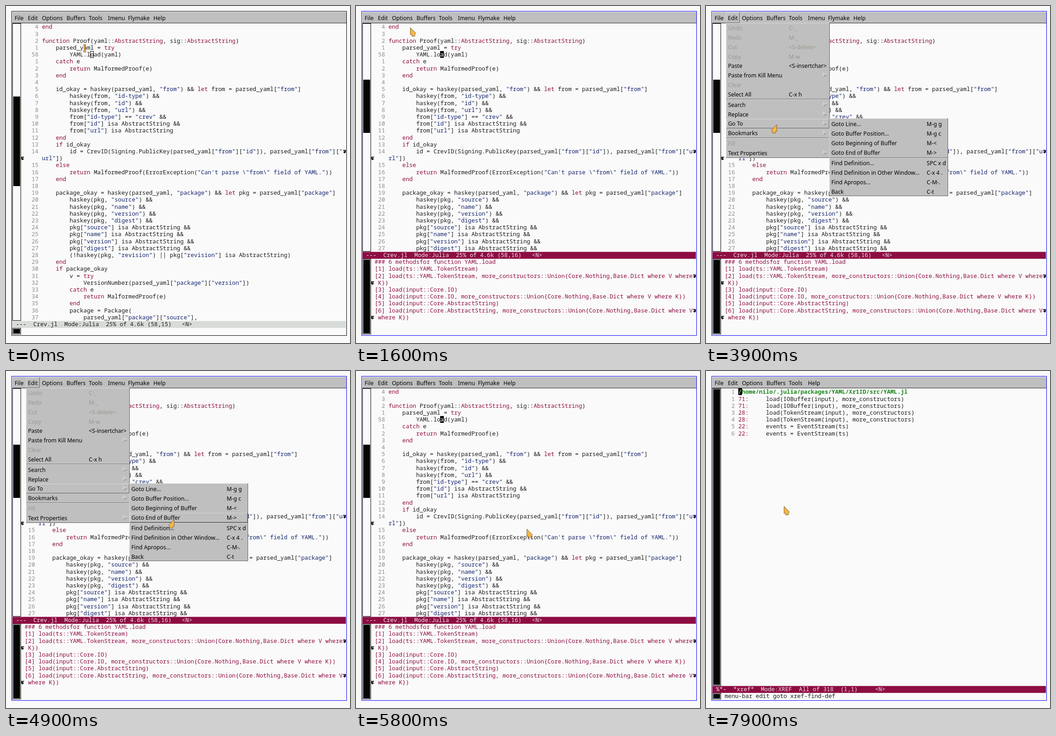
Recreate the animation shown at these times as an HTML page with a canvas. Size 756 px wide and 741 px high, loop 8000 ms.

```html
<!DOCTYPE html>
<html lang="en">
<head>
<meta charset="utf-8">
<style>
html, body { margin: 0; width: 100%; height: 100%; overflow: hidden; background: #fafafa; }
canvas { display: block; }
</style>
</head>
<body>
<canvas id="stage" width="756" height="741"></canvas>
<script>
const ctx = document.getElementById('stage').getContext('2d');
const LOOP = 8000, STEP = 100, CHAR = 7.596, LINE = 15.2, RIGHT = 741;
const MONO = '12.66px "Noto Sans Mono", monospace';
const SANS = '12.25px "Noto Sans", sans-serif';
const PAPER = '#fafafa', INK = '#1b1b1b', WINE = '#8d0d42', NAVY = '#13246c',
      GREEN = '#1d871d', GRAY = '#bfbfbf', DIM = '#8c8c8c';

const code = String.raw`end

function Proof(yaml::AbstractString, sig::AbstractString)
    parsed_yaml = try
        YAML.load(yaml)
    catch e
        return MalformedProof(e)
    end

    id_okay = haskey(parsed_yaml, "from") && let from = parsed_yaml["from"]
        haskey(from, "id-type") &&
        haskey(from, "id") &&
        haskey(from, "url") &&
        from["id-type"] == "crev" &&
        from["id"] isa AbstractString &&
        from["url"] isa AbstractString
    end
    if id_okay
        id = CrevID(Signing.PublicKey(parsed_yaml["from"]["id"]), parsed_yaml["from"]["url"])
    else
        return MalformedProof(ErrorException("Can't parse \"from\" field of YAML."))
    end

    package_okay = haskey(parsed_yaml, "package") && let pkg = parsed_yaml["package"]
        haskey(pkg, "source") &&
        haskey(pkg, "name") &&
        haskey(pkg, "version") &&
        haskey(pkg, "digest") &&
        pkg["source"] isa AbstractString &&
        pkg["name"] isa AbstractString &&
        pkg["version"] isa AbstractString &&
        pkg["digest"] isa AbstractString &&
        (!haskey(pkg, "revision") || pkg["revision"] isa AbstractString)
    end
    if package_okay
        v = try
            VersionNumber(parsed_yaml["package"]["version"])
        catch e
            return MalformedProof(e)
        end
        package = Package(
            parsed_yaml["package"]["source"],`.split('\n');

const union = 'more_constructors::Union{Core.Nothing,Base.Dict where V where K})';
const methods = ['### 6 methodsfor function YAML.load'];
['ts::YAML.TokenStream', 'input::Core.IO', 'input::Core.AbstractString'].forEach((arg, i) =>
  methods.push(`[${2 * i + 1}] load(${arg})`, `[${2 * i + 2}] load(${arg}, ${union}`));

const xrefs = ['/home/nilo/.julia/packages/YAML/Xr1ID/src/YAML.jl'];
for (const hit of ['71:     load(IOBuffer(input), more_constructors)',
                   '28:     load(TokenStream(input), more_constructors)',
                   '22:     events = EventStream(ts)']) xrefs.push(hit, hit);

// Menu items: centre y, label, shortcut ('>' opens a submenu), disabled
const editMenu = { x: 44, y: 37, w: 228, h: 297, keyX: 182, seps: [205, 290], items: [
  [48, 'Undo', 'C-_', 1], [69, 'Redo', 'M-_', 1], [90, 'Cut', '<S-delete>', 1],
  [111, 'Copy', 'M-w', 1], [131.5, 'Paste', '<S-insertchar>'], [152, 'Paste from Kill Menu', '>'],
  [173, 'Clear', '', 1], [194, 'Select All', 'C-x h'], [217, 'Search', '>'],
  [238, 'Replace', '>'], [258.5, 'Go To', '>'], [279.5, 'Bookmarks', '>'],
  [302, 'Fill', '', 1], [323, 'Text Properties', '>']] };
const gotoMenu = { x: 271, y: 247, w: 261, h: 171, keyX: 485, seps: [334], items: [
  [259.4, 'Goto Line...', 'M-g g'], [280.4, 'Goto Buffer Position...', 'M-g c'],
  [301.4, 'Goto Beginning of Buffer', 'M-<'], [322.5, 'Goto End of Buffer', 'M->'],
  [345, 'Find Definition...', 'SPC x d'], [366, 'Find Definition in Other Window...', 'C-x 4 .'],
  [387, 'Find Apropos...', 'C-M-.'], [408, 'Back', 'C-t']] };

// Mouse path: time, x, y
const path = [[0, 173, 93], [400, 173, 93], [800, 188, 107], [1100, 186, 110], [1200, 186, 110],
  [1600, 119, 47], [2000, 66, 20], [3800, 66, 20], [3900, 156, 260], [4700, 345, 262],
  [4900, 370, 326], [5100, 368, 350], [5200, 368, 350], [5300, 383, 348], [5400, 375, 347],
  [6800, 375, 347], [7700, 175, 303], [7800, 175, 303], [7900, 171, 297], [8000, 171, 297]];

function mouseAt(t) {
  const i = path.findIndex(p => p[0] > t);
  const [t0, x0, y0] = path[i - 1], [t1, x1, y1] = path[i];
  const k = (t - t0) / (t1 - t0);
  return [x0 + (x1 - x0) * k, y0 + (y1 - y0) * k];
}

function box(x, y, w, h, color) { ctx.fillStyle = color; ctx.fillRect(x, y, w, h); }

function frame(x, y, w, h, color) {
  ctx.strokeStyle = color; ctx.lineWidth = 1;
  ctx.strokeRect(x + .5, y + .5, w - 1, h - 1);
}

function raised(x, y, w, h) {
  box(x, y, w, h, '#606060');
  box(x, y, w - 1, h - 1, '#dadada');
  box(x + 1, y + 1, w - 2, h - 2, GRAY);
}

function label(str, x, y, color = '#000') {
  ctx.font = SANS; ctx.fillStyle = color;
  ctx.fillText(str, x, y);
}

const rowTop = row => Math.round(38.4 + row * LINE);

function mono(str, x, row, color, font = MONO) {
  ctx.font = font; ctx.fillStyle = color;
  [...str].forEach((c, i) => ctx.fillText(c, x + i * CHAR, rowTop(row) + 12));
}

// Small hooked arrow in the fringe of a wrapped line
function wrapMark(x, row, dir) {
  ctx.save();
  ctx.translate(x, rowTop(row) + 8);
  ctx.scale(dir, 1);
  ctx.strokeStyle = ctx.fillStyle = '#000'; ctx.lineWidth = 1.8;
  ctx.beginPath(); ctx.moveTo(-3, -2.5); ctx.lineTo(2, -2.5); ctx.lineTo(2, 1.5); ctx.lineTo(0, 1.5); ctx.stroke();
  ctx.beginPath(); ctx.moveTo(1, -1.5); ctx.lineTo(-3, 1.5); ctx.lineTo(1, 4.5); ctx.fill();
  ctx.restore();
}

const syntax = /("(?:\\.|[^"\\])*")|(\b(?:function|try|catch|return|end|let|if|else)\b|(?<=::)AbstractString)/g;

function colorsOf(line) {
  const colors = Array(line.length).fill(INK);
  for (const m of line.matchAll(syntax))
    colors.fill(m[1] ? NAVY : WINE, m.index, m.index + m[0].length);
  return colors;
}

// Draws one logical line and returns the next free row
function wrapped(line, x, row, colors) {
  const cols = Math.floor((RIGHT - x) / CHAR);
  [...line].forEach((c, i) => {
    if (i && i % cols === 0) {
      wrapMark(744, row, 1);
      wrapMark(36.5, ++row, -1);
    }
    mono(c, x + i % cols * CHAR, row, colors[i]);
  });
  return row + 1;
}

function lineNumber(n, x, row) { mono(String(n), x - (String(n).length + 1) * CHAR, row, DIM); }

function scrollbar(top, bottom, from, to) {
  frame(14, top, 19, bottom - top, '#000');
  box(16, from, 15, to - from, '#050800');
}

function blockCursor(x, row, char) {
  box(x, rowTop(row), 8, 15, '#000');
  mono(char, x, row, PAPER);
}

function codeView(x, lastRow, col, focused) {
  let row = 0;
  for (let i = 0; i < code.length && row < lastRow; i++) {
    lineNumber(i === 4 ? 58 : Math.abs(i - 4), x, row);
    row = wrapped(code[i], x, row, colorsOf(code[i]));
  }
  const cx = Math.round(x + col * CHAR - .4);
  if (focused) blockCursor(cx, 4, code[4][col]);
  else frame(cx, rowTop(4), 8, 15, '#000');
}

function xrefView() {
  xrefs.forEach((line, i) => {
    lineNumber(i || 1, 71, i);
    if (i) {
      mono(line.slice(0, 3), 71, i, WINE);
      mono(line.slice(3), 71 + 3 * CHAR, i, INK);
    } else mono(line, 71, i, GREEN, 'bold ' + MONO);
  });
  blockCursor(71, 0, '/');
}

function submenuArrow(x, y) {
  ctx.lineWidth = 1;
  ctx.beginPath(); ctx.moveTo(x, y + 4.5); ctx.lineTo(x, y - 4.5); ctx.lineTo(x + 9, y);
  ctx.strokeStyle = '#e2e2e2'; ctx.stroke();
  ctx.beginPath(); ctx.moveTo(x, y + 4.5); ctx.lineTo(x + 9, y);
  ctx.strokeStyle = '#808080'; ctx.stroke();
}

function popup(menu, active) {
  const { x, y, w, h, keyX, seps, items } = menu;
  raised(x, y, w, h);
  for (const s of seps) {
    box(x + 1, s - 1, w - 2, 1, '#707070');
    box(x + 1, s, w - 2, 1, '#dadada');
  }
  for (const item of items) {
    const [cy, name, key, off] = item, color = off ? '#999990' : '#000';
    if (item === active) raised(x + 1, Math.round(cy - 11), w - 2, 21);
    label(name, x + 4.4, cy + 4.5, color);
    if (key === '>') submenuArrow(x + 213.5, cy - .5);
    else label(key, keyX, cy + 4.5, color);
  }
}

function pointer(x, y, dir) {
  ctx.save();
  ctx.translate(x, y);
  ctx.scale(dir, 1);
  ctx.beginPath();
  [[.5, .5], [.5, 16], [3.5, 16], [4.5, 20], [10.5, 19], [10, 15.5], [12.5, 13]].forEach(p => ctx.lineTo(...p));
  ctx.closePath();
  ctx.fillStyle = '#f9b641'; ctx.fill();
  ctx.strokeStyle = '#75624a'; ctx.lineWidth = 1; ctx.lineJoin = 'round'; ctx.stroke();
  ctx.restore();
}

function iBeam(x, y) {
  for (const [width, color] of [[3.4, '#75624a'], [1.6, '#f9b641']]) {
    ctx.strokeStyle = color; ctx.lineWidth = width;
    ctx.beginPath();
    ctx.moveTo(x - 3, y - 7); ctx.lineTo(x + 3, y - 7);
    ctx.moveTo(x, y - 7); ctx.lineTo(x, y + 7);
    ctx.moveTo(x - 3, y + 7); ctx.lineTo(x + 3, y + 7);
    ctx.stroke();
  }
}

function draw(t) {
  const focused = t >= 500, moved = t >= 800, split = t >= 1300 && t < 6100, xref = t >= 6200;
  const menuOpen = t >= 2200 && t < 5800;
  const [mx, my] = mouseAt(t);
  const modeRow = split ? 33 : 43, modeTop = rowTop(modeRow);

  box(0, 0, 756, 741, PAPER);
  frame(12, 11, 737, 714, focused ? '#00f' : '#000');

  box(14, 13, 734, 24, GRAY);
  box(14, 37, 734, 1, '#222');
  if (menuOpen) raised(44, 14, 30, 23);
  const bar = [['File', 19], ['Edit', 48], ['Options', 79], ['Buffers', 133], ['Tools', 182]];
  bar.push(...(t >= 6300 ? [['Help', 224]] : [['Imenu', 224], ['Flymake', 268], ['Help', 324]]));
  for (const [name, x] of bar) label(name, x, 30.5);

  if (xref) xrefView();
  else codeView(split ? 71.4 : 79, modeRow, moved ? 15 : 14, focused);

  const thumb = xref ? [40, 690] : split ? [162, 279] : [199, 396];
  scrollbar(38, modeTop, ...thumb);
  scrollbar(modeTop + 16, 722, modeTop + 18, 720);

  box(14, modeTop + .6, 733, 15.2, focused ? WINE : '#d8dcd8');
  const status = xref ? '%*-  *xref*  Mode:XREF  All of 318  (1,1)     <N>'
    : `---  Crev.jl  Mode:Julia  25% of 4.6k (58,${moved ? 16 : 15})   <N>`;
  mono(status, 22, modeRow, focused ? '#f3e3ea' : INK);

  if (split) {
    let row = 34;
    for (const line of methods) row = wrapped(line, 41, row, Array(line.length).fill(WINE));
  } else if (t >= 6100) mono('menu-bar edit goto xref-find-def', 41, 44, INK);

  if (menuOpen) {
    const sub = t >= 3900;
    popup(editMenu, sub && editMenu.items[10]);
    if (sub) popup(gotoMenu, mx > 272 && gotoMenu.items.find(item => Math.abs(item[0] - my) < 11));
  }

  if (t < 1500) iBeam(mx, my);
  else pointer(mx, my, menuOpen ? -1 : 1);
}

let shown = -1;
function tick() {
  const t = Math.floor(performance.now() % LOOP / STEP) * STEP;
  if (t !== shown) draw(shown = t);
  requestAnimationFrame(tick);
}
tick();
</script>
</body>
</html>
```
